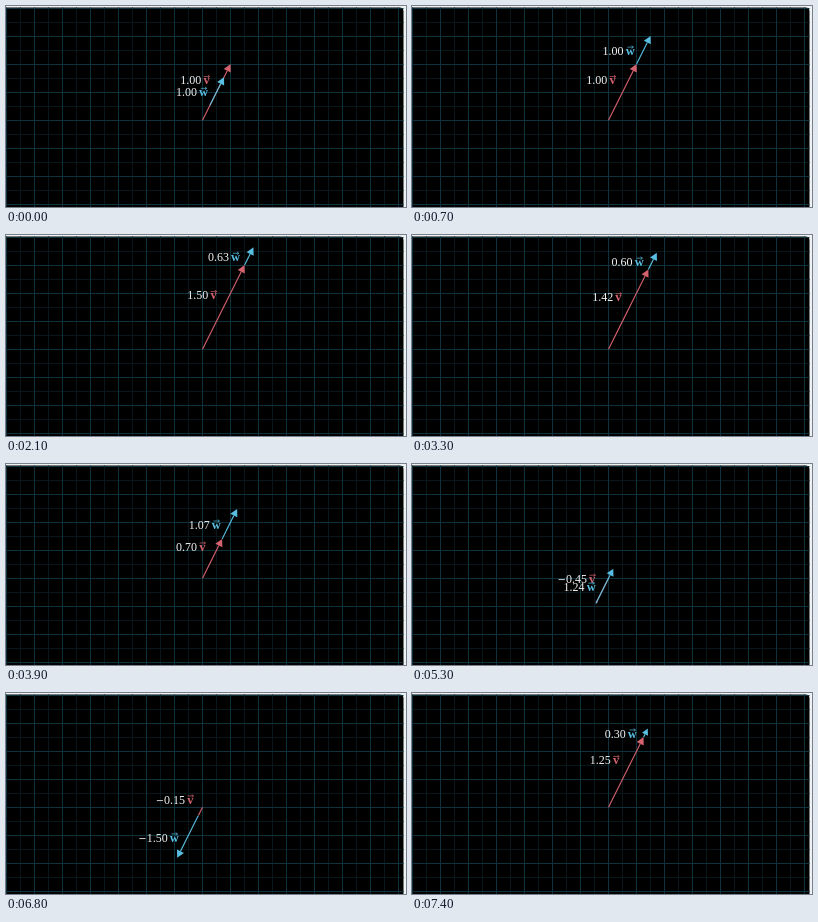
Write an HTML page that moves like this. It is 400 px wide and 201 px high and loops after 7500 ms.

```html
<!DOCTYPE html>
<html lang="en">
<head>
<meta charset="utf-8">
<title>Scaling two vectors</title>
<style>
  html, body { margin: 0; width: 100%; height: 100%; overflow: hidden; background: #eef2f3; }
  svg { display: block; width: 100%; height: 100%; }
  text { font-family: "Liberation Serif", serif; font-size: 12px; }
  .minus { font-family: "DejaVu Sans", sans-serif; font-size: 10px; }
  .num { fill: #f2f2f2; text-anchor: end; }
  .name { font-weight: bold; font-size: 12.5px; text-anchor: middle; }
</style>
</head>
<body>
<svg viewBox="0 0 400 201" preserveAspectRatio="none">
  <path d="M0 1.5H393.5Q397.5 1.5 397.5 5.5V201H0Z" fill="#000"/>
  <g fill="none" stroke-width="1">
    <path id="minor" stroke="#07171b"/>
    <path id="major" stroke="#0d323d"/>
  </g>
  <g id="arrows"></g>
  <g id="labels"></g>
</svg>
<script>
const LOOP = 7500, STEP = 100;
const ORIGIN = [196.5, 114.2], UNIT = 28.05;
const DIR = [1 / Math.sqrt(5), -2 / Math.sqrt(5)];
const HEAD = 7.4, HALF = 3.9;
const $ = id => document.getElementById(id);

function node(tag, parent, attrs) {
  const el = document.createElementNS("http://www.w3.org/2000/svg", tag);
  for (const k in attrs) el.setAttribute(k, attrs[k]);
  parent.append(el);
  return el;
}

function grid(offset) {
  let d = "";
  for (let i = -7; i <= 7; i++) {
    const x = ORIGIN[0] + (i + offset) * UNIT;
    const y = Math.round(ORIGIN[1] + (i + offset) * UNIT - 0.5) + 0.5;
    if (x > 0 && x < 397) d += `M${Math.floor(x) + 0.5} 1.5V201`;
    if (y > 2 && y < 201) d += `M0 ${y}H397.5`;
  }
  return d;
}
$("major").setAttribute("d", grid(0));
$("minor").setAttribute("d", grid(0.5));

// Sigmoid easing, flat at both ends
function smooth(t) {
  if (t <= 0) return 0;
  if (t >= 1) return 1;
  const s = x => 1 / (1 + Math.exp(-x)), e = s(-5);
  return (s(10 * (t - 0.5)) - e) / (1 - 2 * e);
}
const squish = (t, a, b) => smooth((t - a) / (b - a));

const moves = [
  { start: 664, time: 1760, to: [1.5, 0.6] },
  { start: 3061, time: 1200, to: [0.7, 1.3] },
  { start: 4819, time: 1200, to: [-1, -1.5] },
  { start: 6422, time: 1200, to: [1.25, 0.46] }
];
const spans = [[0, 0.7], [0.3, 1]];

// Scalar and head size of both vectors; heads flip by shrinking through zero
function scalars(t) {
  let from = [1, 1], now = from.map(k => ({ k, head: 1 }));
  for (const m of moves) {
    if (t < m.start) break;
    now = m.to.map((k, i) => {
      const f = squish((t - m.start) / m.time, ...spans[i]);
      const mix = (a, b) => a + (b - a) * f;
      return { k: mix(from[i], k), head: mix(Math.sign(from[i]), Math.sign(k)) };
    });
    from = m.to;
  }
  return now;
}

function makeVector(letter, color, length, place) {
  const g = node("g", $("arrows"), { fill: color, stroke: color });
  const label = node("g", $("labels"), {});
  const num = node("text", label, { class: "num", x: place.num });
  const minus = node("tspan", num, { class: "minus" });
  const value = node("tspan", num, {});
  node("text", label, { class: "name", x: place.name, fill: color }).textContent = letter;
  node("path", label, {
    d: `M${place.name - 2.8} -7.6h6m-1.8-1.4l1.8 1.4-1.8 1.4`,
    fill: "none", stroke: color, "stroke-width": 0.7
  });
  return {
    length, place, label, minus, value,
    line: node("path", g, { "stroke-width": 1.15 }),
    tip: node("path", g, { stroke: "none" })
  };
}

const v = makeVector("v", "#d5626f", 2 * UNIT * Math.sqrt(5) / 2, { num: -15.3, name: -10, base: -8 });
const w = makeVector("w", "#58bfe2", UNIT * Math.sqrt(5) / 2, { num: -20, name: -13.4, base: 4.7 });

const along = (p, d) => [p[0] + DIR[0] * d, p[1] + DIR[1] * d];

function drawVector(vec, tail, { k, head }) {
  const end = along(tail, k * vec.length);
  const back = along(end, -HEAD * head);
  const nx = -DIR[1] * HALF * head, ny = DIR[0] * HALF * head;
  vec.line.setAttribute("d", `M${tail}L${back}`);
  vec.tip.setAttribute("d", `M${end}L${back[0] + nx} ${back[1] + ny}L${back[0] - nx} ${back[1] - ny}Z`);
  const mid = along(tail, k * vec.length / 2);
  vec.label.setAttribute("transform", `translate(${mid[0]} ${mid[1] + vec.place.base})`);
  vec.minus.textContent = k < -0.005 ? "\u2212" : "";
  vec.value.textContent = Math.abs(k).toFixed(2);
  return end;
}

function draw(ms) {
  const t = Math.floor((ms % LOOP) / STEP) * STEP;
  const [a, b] = scalars(t);
  drawVector(v, ORIGIN, a);
  const slide = smooth((t + 400) / 1000);
  drawVector(w, along(ORIGIN, a.k * v.length * slide), b);
}

const begin = performance.now();
function tick() {
  draw(performance.now() - begin);
  requestAnimationFrame(tick);
}
tick();
</script>
</body>
</html>
```
